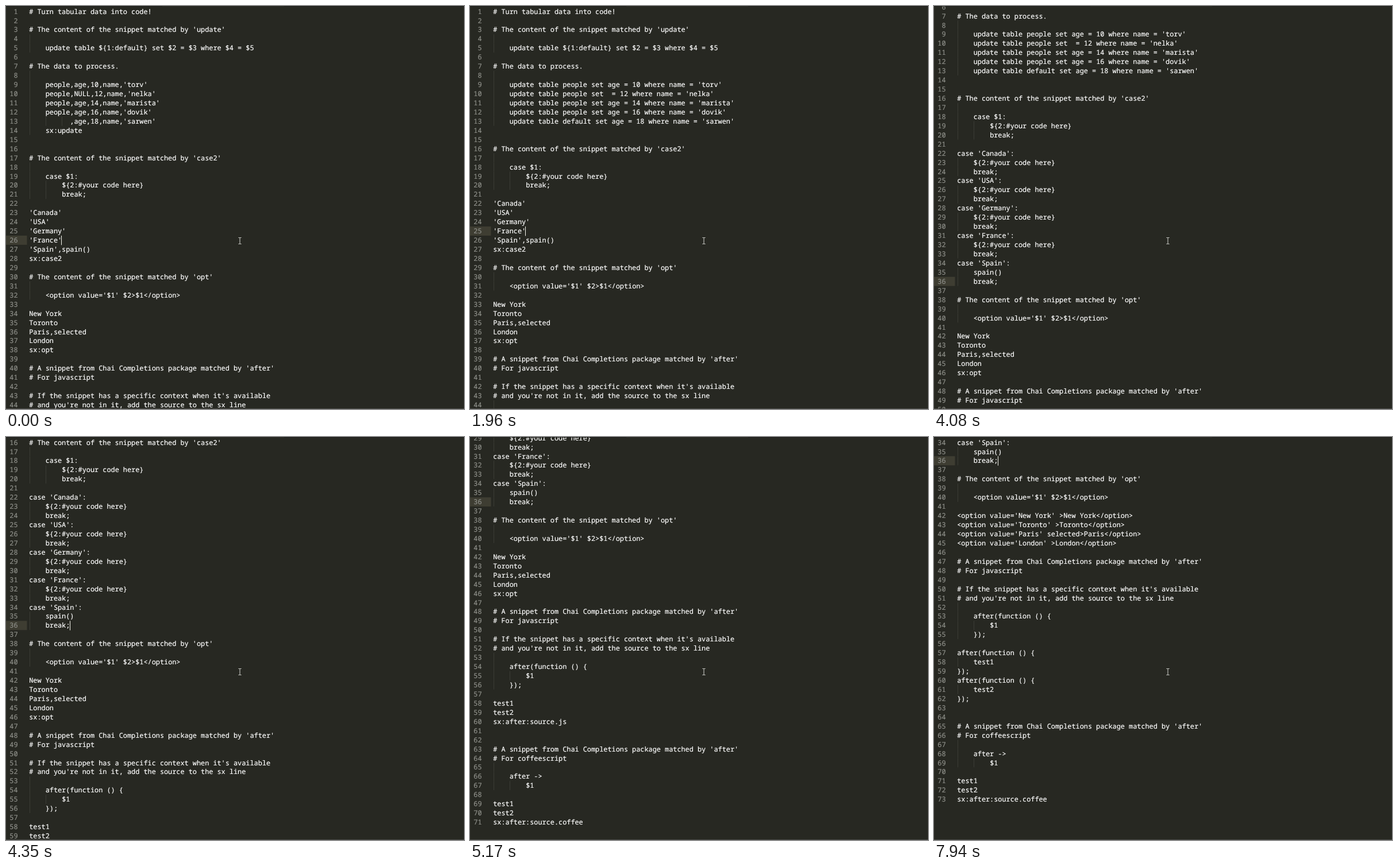
An HTML page for the animation above (8000 ms loop, 797 by 702 pixels).

```html
<!DOCTYPE html>
<html lang="en">
<head>
<meta charset="utf-8">
<title>Tabular data into code</title>
<style>
  html, body { margin: 0; width: 100%; height: 100%; overflow: hidden; background: #272822; }
  svg { display: block; width: 797px; height: 702px; }
  text {
    font: 500 11.86px "Noto Sans Mono", "DejaVu Sans Mono", monospace;
    fill: #fff;
    stroke: #fff;
    stroke-width: .2px;
    white-space: pre;
    text-rendering: geometricPrecision;
  }
  .num { font-weight: 400; fill: #8f908a; stroke: #8f908a; text-anchor: end; }
  .guide { fill: #3b3c35; }
</style>
</head>
<body>
<svg viewBox="0 0 797 702">
  <rect width="797" height="702" fill="#272822"/>
  <g id="page"></g>
  <rect id="caret" width="1" height="16.4" fill="#f8f8f0"/>
  <path d="M404.5 403.5h2l.5.5.5-.5h2M407 404v10M404.5 414.5h2l.5-.5.5.5h2" fill="none" stroke="#d8d8d4"/>
  <path d="M0 .5H272M484 .5H797" stroke="#1d1e1a"/>
  <path d="M0 701.5H797" stroke="#4a4b47"/>
</svg>
<script>
const LOOP = 8000, CHAR = 7.116, ROW = 15.94, LEFT = 40, TOP = 1.5;
const page = document.getElementById('page');
const caret = document.getElementById('caret');

const people = [['torv', 10], ['nelka', 12], ['marista', 14], ['dovik', 16], ['sarwen', 18]];
const countries = ['Canada', 'USA', 'Germany', 'France', 'Spain'];
const cities = ['New York', 'Toronto', 'Paris', 'London'];
const tests = ['test1', 'test2'];
const heading = name => `# The content of the snippet matched by '${name}'`;
const chai = lang => ["# A snippet from Chai Completions package matched by 'after'", '# For ' + lang, ''];

const peopleRows = done => done
  ? people.map(([name, age], i) =>
      `    update table ${i === 4 ? 'default' : 'people'} set ${i === 1 ? '' : 'age'} = ${age} where name = '${name}'`)
  : [...people.map(([name, age], i) =>
      `    ${i === 4 ? '      ' : 'people'},${i === 1 ? 'NULL' : 'age'},${age},name,'${name}'`), '    sx:update'];

const countryRows = done => done
  ? countries.flatMap(c =>
      [`case '${c}':`, c === 'Spain' ? '    spain()' : '    ${2:#your code here}', '    break;'])
  : [...countries.map(c => `'${c}'` + (c === 'Spain' ? ',spain()' : '')), 'sx:case2'];

const cityRows = done => done
  ? cities.map(c => `<option value='${c}' ${c === 'Paris' ? 'selected' : ''}>${c}</option>`)
  : [...cities.map(c => c + (c === 'Paris' ? ',selected' : '')), 'sx:opt'];

const testRows = done => done
  ? tests.flatMap(t => ['after(function () {', '    ' + t, '});'])
  : [...tests, 'sx:after:source.js'];

// The first `stage` tables have been expanded.
const buildLines = stage => [
  '# Turn tabular data into code!', '',
  heading('update'), '',
  '    update table ${1:default} set $2 = $3 where $4 = $5', '',
  '# The data to process.', '',
  ...peopleRows(stage > 0), '', '',
  heading('case2'), '',
  '    case $1:', '        ${2:#your code here}', '        break;', '',
  ...countryRows(stage > 1), '',
  heading('opt'), '',
  "    <option value='$1' $2>$1</option>", '',
  ...cityRows(stage > 2), '',
  ...chai('javascript'),
  "# If the snippet has a specific context when it's available",
  "# and you're not in it, add the source to the sx line", '',
  '    after(function () {', '        $1', '    });', '',
  ...testRows(stage > 3), '', '',
  ...chai('coffeescript'),
  '    after ->', '        $1', '',
  ...tests, 'sx:after:source.coffee'
];
const docs = [0, 1, 2, 3, 4].map(buildLines);

// Each track holds [time, value] steps.
const stages = [[0, 0], [860, 1], [2090, 2], [6840, 3], [7940, 4]];
const scrolls = [[0, 0], [3930, 1.5], [4080, 5.5], [4210, 9], [4350, 15],
  [4500, 19.5], [4620, 24.5], [4750, 27], [5170, 28.5], [5320, 33]];
const blinks = [[0, 1], [150, .35], [280, 0], [860, 1], [1270, 0], [1960, 1],
  [2520, .35], [2670, 0], [3220, 1], [3650, 0], [4210, 1], [4750, 0],
  [5320, 1], [5600, .35], [5750, 0], [6300, 1], [7270, 0], [7940, 1]];

const at = (track, t) => track.reduce((v, [time, next]) => t >= time ? next : v, track[0][1]);
const escape = s => s.replace(/&/g, '&amp;').replace(/</g, '&lt;').replace(/>/g, '&gt;');
const indentOf = s => s.search(/\S/);

function drawRow(lines, i, y) {
  const line = lines[i];
  // Blank lines take the guides of the line below.
  const indent = Math.max(0, indentOf(line || lines[i + 1] || ''));
  let out = '';
  for (let col = 0; col < indent; col += 4)
    out += `<rect class="guide" x="${Math.round(LEFT + col * CHAR + .5)}" y="${y}" width="1" height="${ROW}"/>`;
  out += `<text class="num" x="20.6" y="${y + 12.1}">${i + 1}</text>`;
  if (line) out += `<text x="${LEFT + indent * CHAR + .2}" y="${y + 12.1}">${escape(line.trim())}</text>`;
  return out;
}

let shown = '';
function render(t) {
  const stage = at(stages, t), scroll = at(scrolls, t);
  const [caretLine, caretCol] = [[25, 8], [24, 8], [35, 10]][Math.min(stage, 2)];
  const rowY = i => TOP + (i - scroll) * ROW;
  const key = stage + '/' + scroll;
  if (key !== shown) {
    shown = key;
    const lines = docs[stage];
    let out = `<rect y="${rowY(caretLine)}" width="36.5" height="${ROW}" fill="#3e3d32"/>`;
    const last = Math.min(lines.length, Math.ceil(scroll) + 45);
    for (let i = Math.max(0, Math.floor(scroll)); i < last; i++) out += drawRow(lines, i, rowY(i));
    page.innerHTML = out;
  }
  caret.setAttribute('x', Math.floor(LEFT + caretCol * CHAR));
  caret.setAttribute('y', rowY(caretLine));
  caret.setAttribute('opacity', at(blinks, t));
}

const start = performance.now();
function tick() {
  render((performance.now() - start) % LOOP);
  requestAnimationFrame(tick);
}
tick();
</script>
</body>
</html>
```
